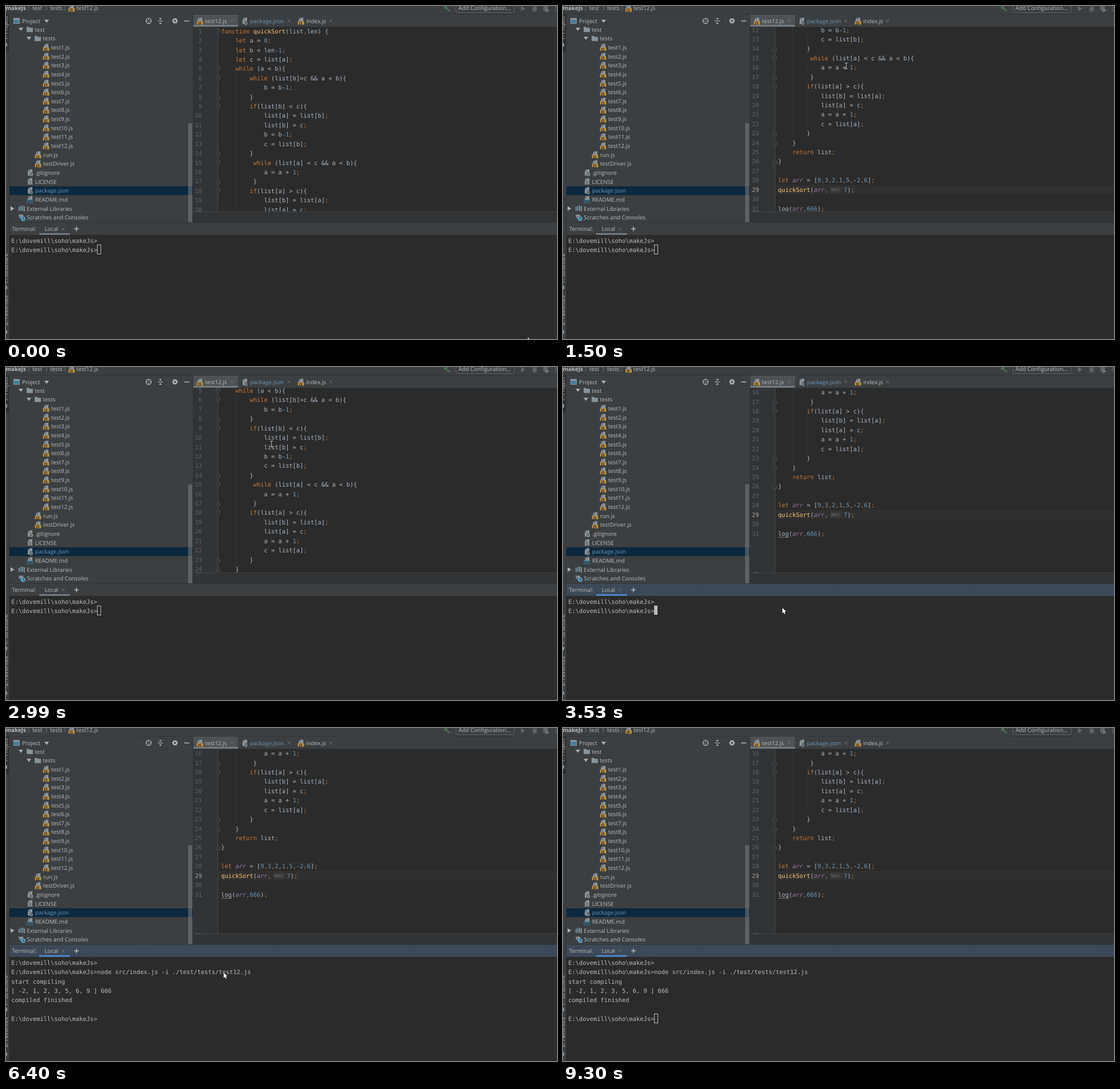
Recreate the animation shown at these times as an HTML page with a canvas. Size 962x582 px, loop 9360 ms.

```html
<!DOCTYPE html>
<html lang="en">
<head>
<meta charset="utf-8">
<title>Editor and terminal</title>
<style>
html, body { margin: 0; width: 100%; height: 100%; overflow: hidden; background: #2b2b2b; }
canvas { display: block; }
</style>
</head>
<body>
<canvas id="stage" width="962" height="582"></canvas>
<script>
const ctx = document.getElementById('stage').getContext('2d');
ctx.textRendering = 'geometricPrecision';

const LOOP = 9360, CHAR = 6.25, LINE = 16.42;
const MONO = '10.38px "DejaVu Sans Mono", monospace';
const UI = '9.8px "Open Sans", "Noto Sans", sans-serif';
const GREY = '#bbbbbb', ICON = '#8b969d', BLUE = '#6897bb', PANEL = '#3c3f41', DARK = '#2b2b2b';

const code = `function quickSort(list,len) {
    let a = 0;
    let b = len-1;
    let c = list[a];
    while (a < b){
        while (list[b]>c && a < b){
            b = b-1;
        }
        if(list[b] < c){
            list[a] = list[b];
            list[b] = c;
            b = b-1;
            c = list[b];
        }
         while (list[a] < c && a < b){
            a = a + 1;
         }
        if(list[a] > c){
            list[b] = list[a];
            list[a] = c;
            a = a + 1;
            c = list[a];
        }
    }
    return list;
}

let arr = [9,3,2,1,5,-2,6];
quickSort(arr, 7);

log(arr,666);`.split('\n');
const foldStart = [1, 5, 6, 9, 15, 18], foldEnd = [8, 14, 17, 23, 24, 26];

const prompt = 'E:\\dovemill\\soho\\makeJs>';
const command = 'node src/index.js -i ./test/tests/test12.js';
const output = ['start compiling', '[ -2, 1, 2, 3, 5, 6, 9 ] 666', 'compiled finished', '', prompt];

// [time, value...]
const scrollKeys = [[930, 0], [1499, 182.6], [1780, 245.8], [2440, 245.8], [2518, 242],
  [2750, 0], [2830, 0], [2989, 68.3], [3370, 245.8]];
const mouseKeys = [[70, 911, 579], [400, 650, 190], [560, 530, 20], [690, 503, 60], [1100, 494, 104],
  [1600, 494, 104], [2518, 466, 124], [2989, 464, 134], [3200, 455, 150], [3450, 383, 421],
  [3680, 383, 421], [3760, 383, 424], [6300, 383, 424], [6550, 375, 433], [6640, 375, 433],
  [6720, 373, 435], [6870, 373, 435], [7100, 395, 330], [7270, 402, 304], [7570, 402, 304],
  [7800, 789, 523], [7960, 882, 570], [8120, 875, 595]];
// terminal cursor: [time, row, column, look]
const cursorKeys = [[0, 1, 24, 'hollow'], [3530, 1, 24, 'full'], [4370, 1, 67, 'full'], [4920, 1, 67, ''],
  [5230, 2, 0, 'full'], [5470, 6, 24, 'full'], [6400, 6, 24, ''], [6950, 6, 24, 'full'], [7500, 6, 24, ''],
  [8040, 6, 24, 'full'], [8590, 6, 24, ''], [9060, 6, 24, 'full'], [9300, 6, 24, 'hollow']];

function tween(keys, t) {
  const i = keys.findIndex(k => k[0] > t);
  if (i < 0) return keys.at(-1).slice(1);
  if (i === 0) return keys[0].slice(1);
  const a = keys[i - 1], b = keys[i], p = (t - a[0]) / (b[0] - a[0]);
  return a.slice(1).map((v, j) => v + (b[j + 1] - v) * p);
}
function snap(t) {
  const [start, step] = t < 5000 ? [10, 78.4] : [0, 78];
  return start + Math.floor((t - start) / step) * step;
}

function rect(x, y, w, h, c) { ctx.fillStyle = c; ctx.fillRect(x, y, w, h); }
function text(s, x, y, c = GREY, font = UI) {
  ctx.font = font; ctx.fillStyle = c; ctx.fillText(s, x, y);
}
function path(pts, close) {
  ctx.beginPath();
  for (let i = 0; i < pts.length; i += 2) ctx.lineTo(pts[i], pts[i + 1]);
  if (close) ctx.closePath();
}
function fill(c, ...pts) { path(pts, true); ctx.fillStyle = c; ctx.fill(); }
function line(c, w, ...pts) { path(pts); ctx.strokeStyle = c; ctx.lineWidth = w; ctx.stroke(); }
function dot(x, y, r, c, w) {
  ctx.beginPath(); ctx.arc(x, y, r, 0, 7);
  if (w) { ctx.strokeStyle = c; ctx.lineWidth = w; ctx.stroke(); }
  else { ctx.fillStyle = c; ctx.fill(); }
}
function cross(x, y) {
  line('#6b6f71', 1, x - 2.5, y - 2.5, x + 2.5, y + 2.5);
  line('#6b6f71', 1, x - 2.5, y + 2.5, x + 2.5, y - 2.5);
}
function down(x, y) { fill('#adadad', x - 4, y - 2.5, x + 4, y - 2.5, x, y + 3); }

function fileIcon(kind, x, y) {
  if (kind === 'dir') {
    fill('#87939a', x, y - 4.5, x + 4, y - 4.5, x + 5.5, y - 3, x + 11, y - 3, x + 11, y + 4.5, x, y + 4.5);
    return;
  }
  fill(ICON, x + 5, y - 6, x + 9.5, y - 6, x + 9.5, y + 5, x + 1.5, y + 5, x + 1.5, y - 2.2, x + 5, y - 2.2);
  fill('#a4adb2', x + 1.5, y - 2.8, x + 4.4, y - 6, x + 4.4, y - 2.8);
  if (kind === 'js' || kind === 'md') {
    const js = kind === 'js';
    rect(x, y, 11, 6, js ? '#bd8d3c' : '#3f86a8');
    text(js ? 'JS' : 'MD', x + (js ? 2 : 0.6), y + 5.4, '#2b2b2b', 'bold 6.6px "Open Sans", sans-serif');
  } else if (kind === 'txt') {
    for (const d of [-1, 1, 3]) rect(x + 3, y + d, 5, 0.8, '#505558');
  } else {
    dot(x + 8, y + 3, 3.6, PANEL);
    if (kind === 'json') text('{}', x + 4.6, y + 5.4, '#b4bcc0', 'bold 7px "Open Sans", sans-serif');
    else { dot(x + 8, y + 3, 2.4, '#b4bcc0', 1); line('#b4bcc0', 1, x + 6.4, y + 4.6, x + 9.6, y + 1.4); }
  }
}

function topBar() {
  rect(0, 0, 962, 15, PANEL);
  rect(0, 14, 962, 1, '#323537');
  text('makeJs', -0.5, 7.2, GREY, 'bold ' + UI);
  text('test', 46, 7.2);
  text('tests', 77, 7.2);
  for (const x of [38, 69, 101]) line('#707476', 1, x, 0, x + 3, 4, x, 8);
  fileIcon('js', 109, 4);
  text('test12.js', 123, 7.2);
  line('#487a53', 2.2, 768, 3, 775, 9);
  line('#487a53', 3, 765, 4, 770, 0);
  ctx.strokeStyle = '#5e6264'; ctx.lineWidth = 1;
  ctx.beginPath(); ctx.roundRect(785.5, -6.5, 102, 18, 3); ctx.stroke();
  text('Add Configuration...', 790, 7.2);
  const dim = '#616567';
  fill(dim, 899, 0, 907, 4.5, 899, 9);
  dot(923, 5, 3.5, dim);
  for (const y of [1, 5, 9]) line(dim, 1, 918.5, y, 927.5, y);
  fill(dim, 938, 0, 946, 0, 946, 5, 942, 10, 938, 7);
  fill('#74787a', 943, 4, 949, 7.5, 943, 11);
  dot(963, 5, 4, dim, 1.2);
}

function sideStrip() {
  rect(0, 15, 5, 567, PANEL);
  rect(0, 15, 5, 65, '#2d2f30');
  ctx.save();
  ctx.beginPath(); ctx.rect(0, 15, 5, 567); ctx.clip();
  for (const [s, y] of [['1: Project', 60], ['7: Structure', 485], ['2: Favorites', 558]]) {
    ctx.save(); ctx.translate(2.5, y); ctx.rotate(-Math.PI / 2);
    text(s, 0, 0);
    ctx.restore();
  }
  for (const y of [65, 489, 567]) rect(0, y, 2, 6, ICON);
  ctx.restore();
  rect(5, 15, 1, 567, '#323537');
}

function projectTree() {
  rect(6, 15, 320, 364, PANEL);
  rect(13, 21, 11, 10, ICON);
  rect(14, 24, 9, 6, '#3d7fa0');
  text('Project', 28, 29.6);
  down(71, 26.5);
  dot(249, 26, 4.6, '#afb1b3', 1.3);
  line('#afb1b3', 1.2, 249, 21, 249, 24.5); line('#afb1b3', 1.2, 249, 27.5, 249, 31);
  line('#afb1b3', 1.2, 244, 26, 247.5, 26); line('#afb1b3', 1.2, 250.5, 26, 254, 26);
  rect(265, 25.5, 9, 1.2, '#afb1b3');
  fill('#afb1b3', 267, 21, 272, 21, 269.5, 24); fill('#afb1b3', 267, 31, 272, 31, 269.5, 28);
  rect(283, 19, 1, 14, '#484b4d');
  dot(295, 26, 3, '#afb1b3', 2.4);
  for (let i = 0; i < 6; i++) {
    const c = Math.cos(i * Math.PI / 3), s = Math.sin(i * Math.PI / 3);
    line('#afb1b3', 2, 295 + 3 * c, 26 + 3 * s, 295 + 5 * c, 26 + 5 * s);
  }
  rect(311, 25.5, 9, 1.3, '#c4c6c8');

  const rows = [['dir', 36, 'test'], ['dir', 50, 'tests']];
  for (let i = 1; i <= 12; i++) rows.push(['js', 64.5, `test${i}.js`]);
  rows.push(['js', 50.5, 'run.js'], ['js', 50.5, 'testDriver.js'], ['git', 36.5, '.gitignore'], ['txt', 36.5, 'LICENSE'],
    ['json', 36.5, 'package.json'], ['md', 36.5, 'README.md'], ['lib', 22, 'External Libraries'], ['scratch', 22, 'Scratches and Consoles']);
  rows.forEach(([kind, x, name], i) => {
    const y = 41 + i * 15.65;
    if (kind === 'json') rect(6, 315, 320, 15.5, '#0d293e');
    if (kind === 'lib') {
      fill('#adadad', 8, y - 4, 14.5, y, 8, y + 4);
      for (let k = 0; k < 4; k++) rect(x + k * 3, y - (k ? 5 : 3) + (k === 3), 1.8, k ? 9 : 7, k === 1 ? '#4a9fc4' : ICON);
    } else if (kind === 'scratch') {
      fill(ICON, x, y - 5, x + 8, y - 5, x + 8, y, x + 5, y + 3, x + 1, y);
      line(PANEL, 1, x + 2, y - 3, x + 4, y - 1, x + 2, y + 1);
      dot(x + 8, y + 2, 4, '#4a9fc4'); line('#2f3133', 1, x + 8, y - 0.5, x + 8, y + 2.5, x + 10, y + 2.5);
    } else fileIcon(kind, x, y);
    if (i < 2) down(x - 10, y - 0.5);
    text(name, x + 14.3, y + 3.6, kind === 'json' ? BLUE : GREY);
  });
  rect(318, 205, 7, 173, 'rgba(130,133,135,.5)');
  rect(326, 15, 1, 364, '#323537');
}

function tabs() {
  rect(327, 15, 635, 22, PANEL);
  rect(327, 15, 78, 21, '#4e5254');
  rect(327, 33, 78, 3, '#747a80');
  rect(405, 36, 557, 1, '#323537');
  for (const [kind, x, name, close] of [['js', 333, 'test12.js', 395], ['json', 411.5, 'package.json', 494], ['js', 509.5, 'index.js', 567]]) {
    fileIcon(kind, x, 26.5);
    text(name, x + 14.6, 29.6, kind === 'json' ? BLUE : GREY);
    cross(close, 26);
  }
}

function codeLine(s, y) {
  const x0 = 375.5;
  for (const m of s.matchAll(/\w+|[;,]|[^\w\s;,]+/g)) {
    const w = m[0];
    let c = '#a9b7c6', font = MONO, x = x0 + m.index * CHAR;
    if (/^(function|let|while|if|return|[;,])$/.test(w)) c = '#cc7832';
    else if (/^\d/.test(w)) c = BLUE;
    else if (w === 'quickSort') c = '#ffc66d';
    else if (w === 'arr') { c = '#9876aa'; font = 'italic ' + MONO; }
    if (s.startsWith('quick') && m.index > 14) x += 21;
    if (w === 'log') line('#858585', 0.9, x, y + 3, x + 19, y + 3);
    text(w, x, y, c, font);
  }
}

function editor(scroll) {
  ctx.save();
  ctx.beginPath(); ctx.rect(327, 37, 635, 323); ctx.clip();
  rect(327, 37, 635, 323, DARK);
  rect(327, 37, 43, 323, '#313335');
  rect(369.5, 37, 1, 323, '#4a4d4f');
  code.forEach((s, i) => {
    const n = i + 1, y = 47.7 + i * LINE - scroll;
    if (y < 25 || y > 375) return;
    if (n === 29) {
      rect(371, y - 12, 591, LINE, '#303030');
      ctx.fillStyle = '#373737';
      ctx.beginPath(); ctx.roundRect(466, y - 9.5, 21, 12, 3); ctx.fill();
      text('len:', 468.5, y - 0.3, '#787878', '9px "Open Sans", sans-serif');
    }
    if (n > 5 && n < 24) rect(400.5, y - 12, 1, LINE, '#343637');
    if (s.startsWith(' '.repeat(12))) rect(425.5, y - 12, 1, LINE, '#343637');
    ctx.textAlign = 'right';
    text(n, 342.3, y, n === 29 ? '#a4a3a3' : '#606366', MONO);
    ctx.textAlign = 'left';
    const dir = foldStart.includes(n) ? 1 : foldEnd.includes(n) ? -1 : 0;
    if (dir) {
      const m = y - 3.5, p = [366.5, m - 3.5 * dir, 373.5, m - 3.5 * dir, 373.5, m + dir, 370, m + 4 * dir, 366.5, m + dir, 366.5, m - 3.5 * dir];
      fill('#2e3031', ...p); line('#545759', 0.8, ...p);
      line('#545759', 0.8, 368.3, m, 371.7, m);
    }
    codeLine(s, y);
  });
  ctx.restore();
  rect(327, 360, 635, 19, '#313335');
  rect(327, 359, 635, 1, '#3f4244');
  rect(331, 359, 10, 1, '#606366');
}

function terminal(t) {
  const focus = t >= 3530;
  rect(6, 378, 956, 1, '#323537');
  rect(6, 379, 956, 21, focus ? '#3c4958' : PANEL);
  if (focus) for (const x of [240, 475, 709, 944]) rect(x, 379, 1, 21, '#384452');
  text('Terminal:', 10.5, 393.4);
  text('Local', 67.5, 393.4);
  cross(100, 390);
  line('#c4c6c8', 1.3, 119, 389.5, 127, 389.5); line('#c4c6c8', 1.3, 123, 385.5, 123, 393.5);
  rect(58, 397, 53.5, 3, focus ? '#4a88c7' : '#747a80');
  rect(6, 400, 956, 182, DARK);
  const lines = [prompt, prompt + (t >= 4370 ? command : ''), ...(t >= 5470 ? output : [])];
  lines.forEach((s, i) => text(s, 9.3, 413.7 + i * LINE, GREY, MONO));
  const [, row, col, look] = cursorKeys.findLast(k => k[0] <= t);
  const x = Math.round(9.3 + col * CHAR), y = Math.round(400.6 + row * LINE);
  if (look === 'full') rect(x, y, 6, 16, GREY);
  if (look === 'hollow') { ctx.strokeStyle = GREY; ctx.lineWidth = 1; ctx.strokeRect(x + 0.5, y + 0.5, 6, 16); }
}

function mouse(x, y) {
  if (x > 371 && y > 37 && y < 360) {
    x = Math.floor(x) + 0.5;
    y = Math.floor(y) + 0.5;
    for (const end of [-5, 5]) line('#b8b8b8', 1, x - 2.5, y + end, x + 2.5, y + end);
    line('#b8b8b8', 1, x, y - 5, x, y + 5);
    return;
  }
  const p = [0, 0, 0, 9.2, 2.1, 7.4, 3.6, 10.8, 5.2, 10.1, 3.8, 6.8, 6.6, 6.6, 0, 0].map((v, i) => v + (i % 2 ? y : x));
  line('#1c1c1c', 1.2, ...p);
  fill('#ffffff', ...p);
}

function draw(now) {
  const t = now % LOOP, q = snap(t);
  topBar();
  sideStrip();
  projectTree();
  tabs();
  editor(tween(scrollKeys, q)[0]);
  terminal(t);
  mouse(...tween(mouseKeys, q));
}

let start;
function frame(now) {
  start ??= now;
  draw(now - start);
  requestAnimationFrame(frame);
}
requestAnimationFrame(frame);
</script>
</body>
</html>
```
